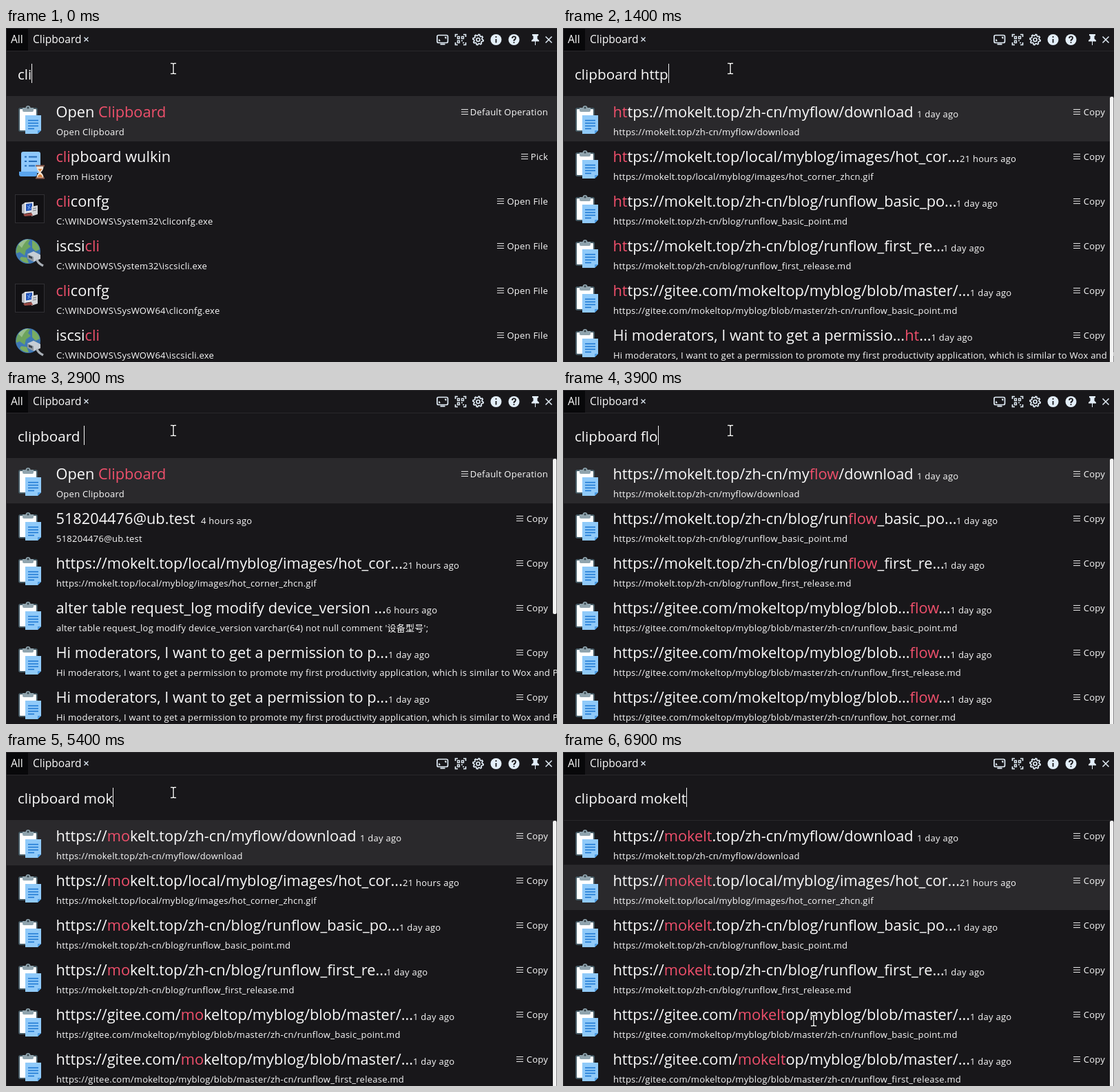
These frames come from a looping animation (800x486 px, 7 s). An HTML page:

```html
<!DOCTYPE html>
<html lang="en">
<head>
<meta charset="utf-8">
<title>Clipboard search</title>
<style>
html, body { margin: 0; width: 100%; height: 100%; overflow: hidden; background: #18171a; }
svg { display: block; width: 100vw; height: 100vh; }
text { font-family: "Open Sans", "Noto Sans CJK SC", "Noto Sans CJK", sans-serif; font-variant-ligatures: none; white-space: pre; fill: #fafafa; }
.tab { font-size: 15.6px; }
.query { font-size: 20.7px; }
.title { font-size: 21.75px; }
.small { font-size: 13px; letter-spacing: .25px; }
.hit { fill: #f0506c; }
.tool { fill: none; stroke: #e3eef8; stroke-width: 1.7; }
.solid { fill: #e3eef8; }
</style>
</head>
<body>
<svg viewBox="0 0 800 486" preserveAspectRatio="none">
  <defs>
    <g id="clip">
      <rect x="18" y="16" width="28" height="35" rx="3" fill="#455a64"/>
      <rect x="20" y="18" width="24" height="31" rx="1" fill="#fff"/>
      <path d="M24 16h16v4q0 2-2 2h-12q-2 0-2-2z" fill="#90a4ae"/>
      <circle cx="32" cy="16.500" r="3.500" fill="#90a4ae"/>
      <circle cx="32" cy="16" r="1.500" fill="#37474f"/>
      <path d="M28 27h23v22l-5 5h-18z" fill="#90caf9"/>
      <path d="M51 49h-5v5z" fill="#4d9ee6"/>
      <path d="M32 34.500h15M32 38.500h15M32 42.500h15M32 46.500h9" stroke="#1976d2" stroke-width="1.600"/>
    </g>
    <g id="past">
      <path d="M22 18q0-3 3-3h22q3 0 3 3v28h-28z" fill="#8fc8fb"/>
      <path d="M19 44h26v4q0 3-3 3h-20q-3 0-3-3z" fill="#5aa5ee"/>
      <path d="M27 22.500h3M33 22.500h12M27 29h3M33 29h12M27 35.500h3M33 35.500h9" stroke="#256cb8" stroke-width="2"/>
      <path d="M44.500 36h10q0 6-4 9q4 3 4 8h-10q0-5 4-8q-4-3-4-9z" fill="#f6e5d4"/>
      <path d="M46.500 40h6l-3 4zM46 52q1-4 3.500-4t3.500 4z" fill="#d9823f"/>
      <path d="M43 35.500h13M43 53.500h13" stroke="#8c5a4b" stroke-width="2.200"/>
    </g>
    <g id="config">
      <rect x="13.500" y="12.500" width="42" height="41" fill="#121114" stroke="#313034"/>
      <path d="M23 27l5-3v17l-5-2z" fill="#b8bcc4"/>
      <path d="M27 24l13-1v15l-13 2z" fill="#e4e6ea"/>
      <path d="M29 26l9-1v10l-9 1.500z" fill="#2455b8"/>
      <path d="M31 29l5 4M35 27l-3 7" stroke="#7fb5ff"/>
      <path d="M37 30l9-2v13l-9 3z" fill="#d4d6da"/>
      <path d="M39 33l5-1M39 36l5-1" stroke="#777c86"/>
      <path d="M25 41l12-2 2 4-12 1z" fill="#9a4a45"/>
    </g>
    <g id="globe">
      <circle cx="32" cy="30" r="18" fill="#3f78b5"/>
      <path d="M18 20q7-9 17-7l-3 6 4 4-7 5-2 8-7-5-5 2q-1-7 3-13z" fill="#6da45d"/>
      <path d="M38 14q9 4 11 13l-6 3-5-5zM22 38l8 1 3 8q-8 0-13-6z" fill="#79ac62"/>
      <path d="M18 20q6-8 15-8-6 4-10 13z" fill="#fff" opacity=".3"/>
      <path d="M31 34l9-4 10 5v6l-10 4-9-5z" fill="#c7ced5"/>
      <path d="M31 34l9 4v7l-9-5z" fill="#8d969f"/>
      <path d="M33 36l5 2v3l-5-2z" fill="#3a4149"/>
      <path d="M45 42q1 5 9 9" fill="none" stroke="#a8afb6" stroke-width="3.500"/>
    </g>
    <path id="menu" d="M0 .5h10M0 4h10M0 7.500h10" fill="none" stroke="#e8e8e8" stroke-width="1.100"/>
  </defs>

  <rect width="800" height="486" fill="#18171a"/>
  <rect x="1" y="1" width="31" height="32" fill="#08080a"/>
  <path d="M0 33.500H800M0 99.500H800M0 .5H800M.5 0V486" fill="none" stroke="#29282b"/>
  <text class="tab" x="7" y="22">All</text>
  <text class="tab" x="39" y="22">Clipboard</text>
  <path class="tool" d="M113.500 13.500l6 6m0-6l-6 6" style="stroke-width:1.200"/>

  <g class="tool">
    <path d="M628 10.500h11.500q2 0 2 2v7q0 2-2 2h-11.500q-2 0-2-2v-7q0-2 2-2zM630.500 23.700h7M637 13.500h1.500v2M630.500 18.500h-1.500v-2"/>
    <path d="M652.500 13v-3.500h3.500M664 9.500h3.500v3.500M667.500 21v3.500h-3.500M656 24.500h-3.500v-3.500"/>
    <path d="M655.500 12.500h3v3h-3zM661.500 12.500h3v3h-3zM655.500 18.500h3v3h-3zM661 18.500h2M663 21.500h2" style="stroke-width:1.300"/>
    <circle cx="685.500" cy="17" r="2.500"/>
    <path id="gear"/>
    <path d="M783.500 12.500l9 9m0-9l-9 9" style="stroke-width:1.500"/>
  </g>
  <g class="solid">
    <circle cx="711.500" cy="17" r="8"/>
    <circle cx="737.500" cy="17" r="8"/>
    <path d="M764 9h9v2l-1.500.8v4l2.500 2.200v1.500h-5v5.500h-1v-5.500h-5v-1.500l2.500-2.200v-4l-1.500-.8z"/>
  </g>
  <path d="M711.500 16v5.500M711.500 12v2M735 15q0-2.700 2.500-2.700t2.500 2.300q0 1.600-2.400 3v1.400M737.500 20.300v1.800" fill="none" stroke="#18171a" stroke-width="1.800"/>

  <text id="query" class="query" x="17" y="75"></text>
  <rect id="caret" y="52" width="1" height="28" fill="#f4f4f4"/>
  <rect id="select" x="1" height="66" fill="#2a292c"/>
  <g id="rows"></g>
  <rect id="bar" x="794" y="100" width="5.500" rx="2" fill="#f3f3f3"/>
  <g id="mouse" fill="none">
    <path d="M-4-7.500h3l1 1 1-1h3M0-6.500V6.500M-4 7.500h3l1-1 1 1h3" stroke="#000" stroke-width="3"/>
    <path d="M-4-7.500h3l1 1 1-1h3M0-6.500V6.500M-4 7.500h3l1-1 1 1h3" stroke="#fff" stroke-width="1.400"/>
  </g>
</svg>
<script>
const LOOP = 7000, ROW = 65, TOP = 100;
const $ = id => document.getElementById(id);

// Rows are [icon, title, sub, action, age, ageX]; brackets or the search term mark the hit.
// Without ageX the age follows the title.
const copy = (title, sub, age, x) => ['clip', title, sub, 'Copy', age, x];
const site = 'https://mokelt.top/', repo = 'https://gitee.com/mokeltop/myblog/blob/master/';
const open = ['clip', 'Open [Clipboard]', 'Open Clipboard', 'Default Operation'];
const tool = (icon, dir, name) =>
  [icon, name.replace('cli', '[cli]'), `C:\\WINDOWS\\${dir}\\${name}.exe`, 'Open File'];

const mail = copy('518204476@ub.test', '518204476@ub.test', '4 hours ago', 283);
const corner = copy(site + 'local/myblog/images/hot_cor...',
  site + 'local/myblog/images/hot_corner_zhcn.gif', '21 hours ago', 576);
const alter = title => copy(title,
  "alter table request_log modify device_version varchar(64) not null comment '设备型号';", '6 hours ago');
const hello = (title, x) => copy(title,
  'Hi moderators, I want to get a permission to promote my first productivity application, which is similar to Wox and PowerToys',
  '1 day ago', x);
const hi = hello('Hi moderators, I want to get a permission to p...', 555);
const article = copy('https://mp.weixin.qq.com/s?__biz=MzUxNwQ0MjA3N...',
  'https://mp.weixin.qq.com/s?__biz=MzUxNwQ0MjA3NQ==&mid=2247561940&idx=1&sn=a4e81c2069db5318cf7eb2d06c',
  '21 hours ago', 628);
const keys = copy('Keyword | ----------------| `emptytrash` | `lo...',
  'Keyword | ----------------| `emptytrash` | `lock` | `restart` | `shutdown` | `sleep` | `screensaver` | `sleepdispaly` | `logout`',
  '17 hours ago', 524);
const download = copy(site + 'zh-cn/myflow/download', site + 'zh-cn/myflow/download', '1 day ago', 514);
const basic = copy(site + 'zh-cn/blog/runflow_basic_po...', site + 'zh-cn/blog/runflow_basic_point.md', '1 day ago', 571);
const first = copy(site + 'zh-cn/blog/runflow_first_re...', site + 'zh-cn/blog/runflow_first_release.md', '1 day ago', 552);
const page = name => `${repo}zh-cn/runflow_${name}.md`;
const blob = name => copy(repo + '...', page(name), '1 day ago', 591);
const deep = name => copy(repo.slice(0, 38) + '...#...', page(name), '1 day ago');

const lists = {
  cli: { bar: 0, rows: [open, ['past', '[cli]pboard wulkin', 'From History', 'Pick'],
    tool('config', 'System32', 'cliconfg'), tool('globe', 'System32', 'iscsicli'),
    tool('config', 'SysWOW64', 'cliconfg'), tool('globe', 'SysWOW64', 'iscsicli')] },
  home: { bar: 226, rows: [open, mail, corner, alter('alter table request_log modify device_version ...'), hi, hi] },
  hist: { bar: 390, rows: [corner, alter('alter table request_log modify device_vers...h...'), hi, hi, article, keys] },
  urls: { bar: 390, rows: [download, corner, basic, first, blob('basic_point'),
    hello('Hi moderators, I want to get a permissio...#...')] },
  flow: { bar: 390, rows: [download, basic, first, deep('basic_point'), deep('first_release'), deep('hot_corner')] },
  mine: { bar: 390, rows: [download, corner, basic, first, blob('basic_point'), blob('first_release')] }
};

// [time, text after "clipboard ", list, search term]
const steps = [
  [400, '', 'home'], [900, 'h', 'home'], [1000, 'h', 'hist', 'h'], [1100, 'ht', 'hist', 'h'],
  [1200, 'ht', 'urls', 'ht'], [1300, 'htt', 'urls', 'ht'], [1400, 'http', 'urls', 'ht'], [1600, 'http', 'urls', 'http'],
  [2100, 'htt', 'urls', 'http'], [2200, 'htt', 'urls', 'htt'], [2300, 'ht', 'urls', 'htt'], [2400, 'h', 'urls', 'htt'],
  [2500, 'h', 'hist', 'h'], [2900, '', 'home'], [3000, 'f', 'home'], [3100, 'fl', 'flow', 'f'],
  [3200, 'flo', 'flow', 'fl'], [3300, 'flow', 'flow', 'flow'], [3900, 'flo', 'flow', 'flow'],
  [4000, 'fl', 'flow', 'flo'], [4100, 'f', 'flow', 'fl'], [4200, '', 'flow', 'f']
].map(([t, word, ...rest]) => [t, 'clipboard ' + word, ...rest]);
steps.unshift([0, 'cli', 'cli']);
steps.push([4300, 'clipboard', 'home'], [5000, 'clipboard ', 'home'], [5200, 'clipboard m', 'home']);
for (let n = 2; n <= 6; n++)
  steps.push([5100 + n * 100, 'clipboard ' + 'mokelt'.slice(0, n), 'mine', 'mokelt'.slice(0, n - 1)]);
steps.push([6000, 'clipboard mokelt', 'mine', 'mokelt']);

const caretOff = [[1900, 2100], [3600, 3900], [4800, 5000], [6200, 6700]];
// [time, x, y, selected row]
const moves = [[0, 243, 59, 0], [6700, 254, 92, 0], [6800, 292, 196, 1], [6900, 364, 391, 1]];
const menuX = { Copy: 741, 'Default Operation': 661, Pick: 748, 'Open File': 713 };

const safe = s => s.replace(/&/g, '&amp;').replace(/</g, '&lt;');
const at = (list, t) => list.filter(item => item[0] <= t).pop();

function mark(title, term) {
  if (term && !title.includes('[')) {
    title = title.replace('#', term);
    const i = title.toLowerCase().indexOf(term);
    if (i >= 0) title = `${title.slice(0, i)}[${title.slice(i, i + term.length)}]${title.slice(i + term.length)}`;
  }
  return safe(title).replace('[', '<tspan class="hit">').replace(']', '</tspan>');
}

function rowSvg([icon, title, sub, action, age, x], i, term) {
  const ageSpan = age ? `<tspan class="small"${x ? ` x="${x}"` : ''}>${age}</tspan>` : '';
  return `<g transform="translate(0 ${TOP + i * ROW})">
    <use href="#${icon}"/>
    <text class="title" x="72.5" y="30">${mark(title, term)}${ageSpan}</text>
    <text class="small" x="73" y="56">${safe(sub)}</text>
    <use href="#menu" x="${menuX[action]}" y="18"/>
    <text class="small" x="787" y="27" text-anchor="end">${action}</text></g>`;
}

function gearPath() {
  let d = '';
  for (let i = 0; i < 32; i++) {
    const a = (i + .5) * Math.PI / 16, r = i % 4 < 2 ? 7.6 : 5.8;
    d += `${i ? 'L' : 'M'}${(685.5 + r * Math.cos(a)).toFixed(2)} ${(17 + r * Math.sin(a)).toFixed(2)}`;
  }
  return d + 'z';
}

let shown;
function showStep(step) {
  const [, text, name, term] = step, { rows, bar } = lists[name];
  $('query').textContent = text;
  $('caret').setAttribute('x', Math.round(17 + $('query').getComputedTextLength()));
  $('rows').innerHTML = rows.map((row, i) => rowSvg(row, i, term)).join('');
  $('bar').setAttribute('height', bar);
  $('select').setAttribute('width', bar ? 793 : 799);
  shown = step;
}

function draw(t) {
  const step = at(steps, t), [, x, y, row] = at(moves, t);
  if (step !== shown) showStep(step);
  const off = caretOff.some(([a, b]) => t >= a && t < b);
  $('caret').setAttribute('visibility', off ? 'hidden' : 'visible');
  $('select').setAttribute('y', TOP - 1 + row * ROW);
  $('mouse').setAttribute('transform', `translate(${x} ${y})`);
}

function tick() {
  draw(performance.now() % LOOP);
  requestAnimationFrame(tick);
}

$('gear').setAttribute('d', gearPath());
tick();
</script>
</body>
</html>
```
